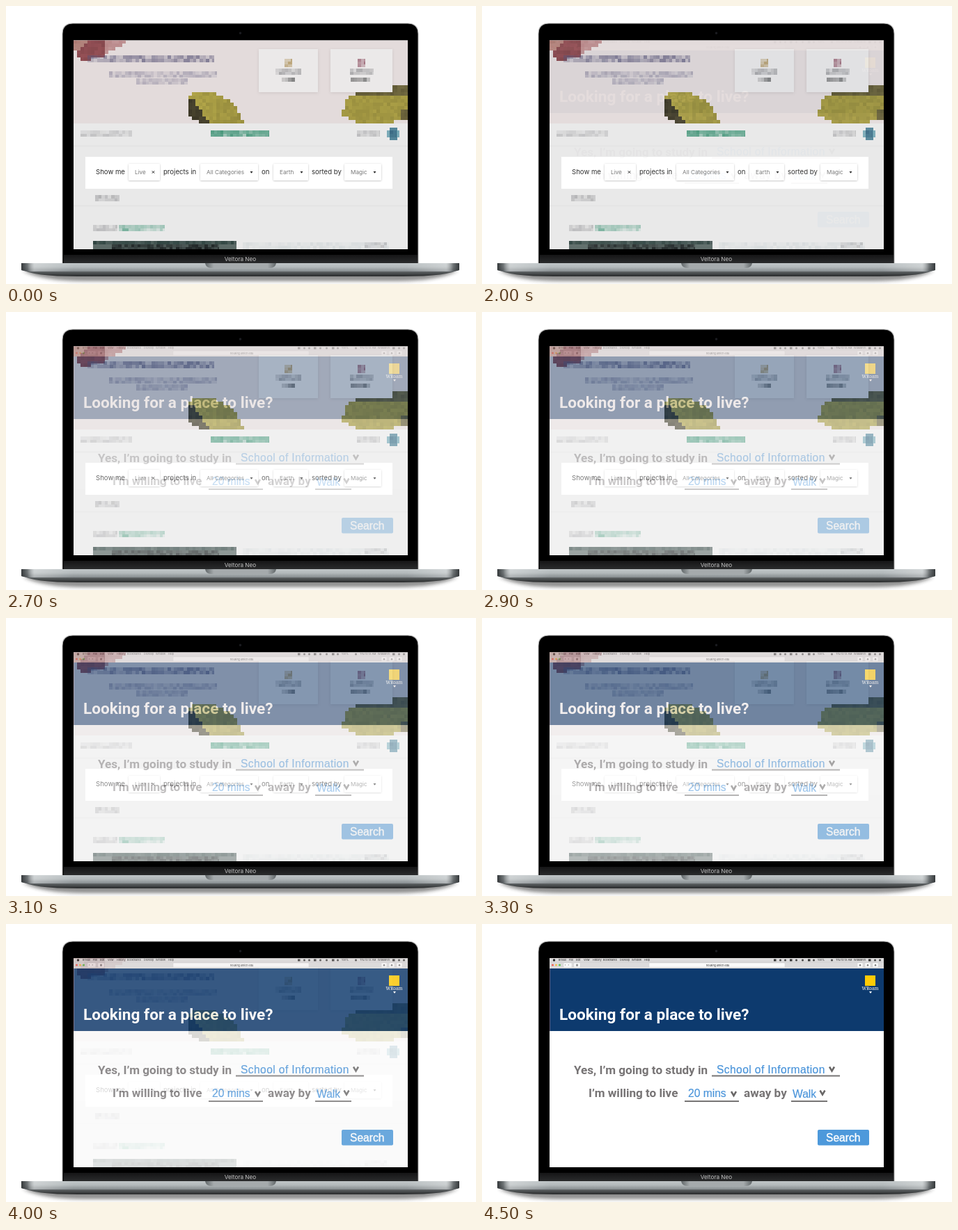
Recreate the animation shown at these times as an HTML page. Size 675 px wide and 400 px high, loop 6.5 s.

```html
<!DOCTYPE html>
<html lang="en">
<head>
<meta charset="utf-8">
<title>Laptop screen crossfade</title>
<style>
  html, body { margin: 0; width: 100%; height: 100%; overflow: hidden; background: #fff; }
  svg { display: block; width: 100vw; height: 100vh; }
  text { white-space: pre; }
  .inter { font-family: Inter, sans-serif; }
  .label { font-size: 9.6px; fill: #2b2b2b; }
  .choice { font-size: 8.2px; fill: #777; }
  .bold { font: bold 17.1px Roboto, sans-serif; fill: #777475; }
  .blue { font: 15.6px "Liberation Sans", Arial, sans-serif; fill: #4a94da; stroke: #4a94da; stroke-width: .2; }
  .tiny { font: 3.7px Inter, sans-serif; fill: #222; }
</style>
</head>
<body>
<svg viewBox="0 0 675 400">
  <defs>
    <linearGradient id="metal" x2="0" y2="1">
      <stop offset="0" stop-color="#bfc5c7"/><stop offset=".45" stop-color="#b4babc"/>
      <stop offset="1" stop-color="#858b8e"/>
    </linearGradient>
    <linearGradient id="ends">
      <stop offset="0" stop-color="#34383a"/><stop offset=".014" stop-color="#34383a" stop-opacity=".55"/>
      <stop offset=".03" stop-color="#fff" stop-opacity=".3"/><stop offset=".12" stop-color="#fff" stop-opacity="0"/>
      <stop offset=".88" stop-color="#fff" stop-opacity="0"/><stop offset=".97" stop-color="#fff" stop-opacity=".3"/>
      <stop offset=".986" stop-color="#34383a" stop-opacity=".55"/><stop offset="1" stop-color="#34383a"/>
    </linearGradient>
    <linearGradient id="under" x2="0" y2="1">
      <stop offset="0" stop-color="#7b8082"/><stop offset="1" stop-color="#27292a"/>
    </linearGradient>
    <linearGradient id="chin" x2="0" y2="1">
      <stop offset="0" stop-color="#151516"/><stop offset="1" stop-color="#2a2b2c"/>
    </linearGradient>
    <linearGradient id="notch">
      <stop offset="0" stop-color="#5f6567"/><stop offset=".12" stop-color="#a5aaac"/>
      <stop offset=".88" stop-color="#a5aaac"/><stop offset="1" stop-color="#5f6567"/>
    </linearGradient>
    <filter id="blur" x="-10%" y="-50%" width="120%" height="200%"><feGaussianBlur stdDeviation="2.5"/></filter>
    <filter id="lift" x="-20%" y="-30%" width="140%" height="170%">
      <feDropShadow dx="0" dy=".6" stdDeviation="1" flood-opacity=".28"/>
    </filter>
    <filter id="glow" x="-10%" y="-20%" width="120%" height="140%">
      <feDropShadow dx="0" dy="1" stdDeviation="2" flood-opacity=".1"/>
    </filter>
    <clipPath id="screen"><path d="M97 49.5H577V350H97Z"/></clipPath>
    <path id="deck" d="M22 370H651V380Q645 382 630 382H43Q28 382 22 380Z"/>
    <path id="lid" d="M82 370V40Q82 26 96 26H577Q591 26 591 40V370Z"/>
  </defs>

  <!-- laptop -->
  <path d="M24 381H649Q620 396 560 396H113Q53 396 24 381Z" fill="#222" opacity=".5" filter="url(#blur)"/>
  <use href="#lid" fill="none" stroke="#000" stroke-opacity=".3" stroke-width="3"/>
  <use href="#lid" stroke="#000"/>
  <path d="M83 358H591V370H83Z" fill="url(#chin)"/>
  <circle cx="336.5" cy="39" r="1.8" fill="#1b1c20"/>
  <text class="inter" x="336.5" y="367" text-anchor="middle" font-size="8.2" fill="#c4c4c4">Veltora Neo</text>
  <path d="M22 379H651Q636 389 570 389H103Q38 389 22 379Z" fill="url(#under)"/>
  <use href="#deck" fill="url(#metal)"/>
  <use href="#deck" fill="url(#ends)"/>
  <path d="M286 370H388Q387 377 379 377H295Q287 377 286 370Z" fill="url(#notch)"/>

  <g clip-path="url(#screen)">
    <!-- first page -->
    <path d="M97 49H577V350H97Z" fill="#e9e9e9"/>
    <path d="M97 49H577V169H97Z" fill="#e3dbdb"/>
    <g id="fruit" shape-rendering="crispEdges"></g>
    <path d="M363 62h85v62h-85ZM466 62h89v62h-89Z" fill="#ebe9e9" filter="url(#glow)"/>
    <path d="M97 201.5H577M97 287.5H577" stroke="#e3e3e3" stroke-width="2"/>
    <g id="blurred" shape-rendering="crispEdges"></g>
    <path d="M114 217H555V263H114Z" fill="#fff"/>
    <g id="filters" class="inter"></g>

    <!-- second page -->
    <g id="finder" opacity="0">
      <path d="M97 49H577V350H97Z" fill="#fff"/>
      <path d="M97 49H577V64H97Z" fill="#dcdbdc"/>
      <path d="M97 55H577" stroke="#c3c2c3" stroke-width=".5"/>
      <path d="M97 64H577V154H97Z" fill="#0d3a6e"/>
      <path d="M97.2 64V154" stroke="#b78087" stroke-width=".7"/>
      <g id="browser"></g>
      <path d="M550 74h15v15h-15Z" fill="#ffcb05"/>
      <text x="557.5" y="94.8" text-anchor="middle" font-family="Noto Serif, serif" font-size="6.3" fill="#fff">WRoam</text>
      <path d="M556 97h4l-2 3Z" fill="#fff"/>
      <text class="bold" x="111" y="138.3" style="font-size:22.6px;fill:#fff">Looking for a place to live?</text>
      <text class="bold" x="132" y="215.5">Yes, I’m going to study in</text>
      <text class="blue" x="337" y="215" letter-spacing=".4">School of Information</text>
      <text class="bold" x="153" y="249">I’m willing to live</text>
      <text class="blue" x="296" y="249">20 mins</text>
      <text class="bold" x="376" y="249">away by</text>
      <text class="blue" x="446" y="249.5">Walk</text>
      <path d="M330 218.5H514M291 255H369M444 255H496" stroke="#767474" stroke-width="2.2"/>
      <path d="M499 205.5l3.5 6 3.5-6M358 241l3.5 6 3.5-6M485.5 239.5l3.5 6 3.5-6" fill="none" stroke="#696767" stroke-width="2.5"/>
      <rect x="482" y="296" width="74" height="22.5" rx="2" fill="#4d99db"/>
      <text class="blue" x="494" y="313" style="fill:#fff;stroke:#fff;stroke-width:.35">Search</text>
    </g>
  </g>
</svg>
<script>
const byId = id => document.getElementById(id);

function add(parent, tag, attributes, content = '') {
  const node = document.createElementNS(parent.namespaceURI, tag);
  for (const key in attributes) node.setAttribute(key, attributes[key]);
  node.textContent = content;
  parent.append(node);
  return node;
}

let seed = 71;
const random = () => (seed = seed * 16807 % 2147483647) / 2147483647;
const rect = (parent, x, y, width, height, fill, opacity = 1) =>
  add(parent, 'rect', { x, y, width, height, fill, opacity });

// Pixelated outline; shade(x, y) picks the colour of each cell.
const canvas = document.createElement('canvas').getContext('2d');
function mosaic(outline, shade) {
  const cell = 5, path = new Path2D(outline);
  for (let y = 49; y < 169; y += cell) {
    for (let x = 97; x < 577; x += cell) {
      // Sampled in page coordinates, so the test canvas needs no size.
      if (canvas.isPointInPath(path, x + cell / 2, y + cell / 2)) {
        rect(byId('fruit'), x, y, cell, Math.min(cell, 169 - y), shade(x, y));
      }
    }
  }
}
const hsl = (h, s, l) => `hsl(${h} ${s}% ${l + random() * 5}%)`;

mosaic('M97 49H173L166 58 150 64 136 76 108 77 97 62Z', (x, y) =>
  x + y < 162 ? hsl(8, 26, 56) : x < 140 ? hsl(355, 30, 40) : hsl(358, 26, 62));
mosaic('M270 123H298L322 137 336 154 342 170H283L261 157V135Z', (x, y) =>
  x - 265 < (y - 128) * .62 && y > 130 ? hsl(48, 22, 19) : hsl(53, 42, 45 - (x - 260) * .06));
mosaic('M487 134L503 125H553V115H577V162L545 169H507L483 156Z', (x, y) =>
  y < 126 || x > 565 && y > 148 ? hsl(50, 28, 30) : hsl(53, 42, 42));

// Each row is a censored piece of the page: x, y, width, height, colour, strength.
function censor(x, y, width, height, color, strength) {
  const cell = 4.6, rows = Math.max(1, Math.round(height / cell));
  for (let row = 0; row < rows; row++) {
    for (let dx = 0; dx < width; dx += cell) {
      rect(byId('blurred'), x + dx, y + row * height / rows, Math.min(cell, width - dx),
        height / rows, color, strength * (.25 + .75 * random()));
    }
  }
}
const gray = '#77777b', green = '#45967a';
[
  [117, 71, 182, 10, '#5c5779', .7],
  [148, 94, 155, 9, '#77738f', .5],
  [187, 104, 74, 9, '#77738f', .45],
  [400, 76, 11, 12, '#a98b4f', .8],
  [387, 90, 37, 9, gray, .55],
  [396, 103, 19, 6, '#555', .7],
  [505, 76, 11, 12, '#93596a', .8],
  [494, 90, 34, 9, gray, .55],
  [495, 103, 28, 6, '#555', .7],
  [107, 179, 74, 9, gray, .35],
  [294, 179, 84, 9, green, .9],
  [294, 179, 84, 9, green, .7],
  [504, 179, 33, 9, gray, .4],
  [128, 272, 35, 9, gray, .5],
  [125, 315, 35, 9, gray, .4],
  [162, 315, 31, 9, green, .75],
  [193, 315, 35, 9, green, .45],
  [340, 340, 210, 10, '#b5c0c4', .35],
  [515, 340, 32, 8, gray, .3],
].forEach(piece => censor(...piece));
rect(byId('blurred'), 125, 338, 206, 12, '#5d6b68');
censor(125, 338, 206, 5, '#263c39', .9);
censor(152, 343, 154, 7, '#161b1c', .9);
rect(byId('blurred'), 551, 175, 11, 18, '#55869a');
rect(byId('blurred'), 547, 179, 18, 10, '#609bac', .8);
censor(551, 179, 10, 10, '#244a69', .8);

const filters = byId('filters');
const text = (parent, x, y, content, className) =>
  add(parent, 'text', { x, y, class: className }, content);
[[129, 'Show me'], [226, 'projects in'], [367, 'on'], [439, 'sorted by']]
  .forEach(([x, label]) => text(filters, x, 241.8, label, 'label'));
[[176, 45, 'Live'], [279, 83, 'All Categories'], [384, 50, 'Earth'], [486, 53, 'Magic']]
  .forEach(([x, width, label]) => {
    add(filters, 'rect', { x, y: 227, width, height: 24, rx: 1.5, fill: '#fff', filter: 'url(#lift)' });
    text(filters, x + 9, 242, label, 'choice');
    const end = x + width - 9.5;
    add(filters, 'path', label === 'Live'
      ? { d: `M${end - 1.7} 237.3l3.4 3.4m0-3.4l-3.4 3.4`, stroke: '#222', 'stroke-width': 1 }
      : { d: `M${end - 2} 238h4l-2 2.8Z`, fill: '#222' });
  });

const browser = byId('browser');
[[110, 'Brolux'], [125, 'File'], [135, 'Edit'], [146, 'View'], [159, 'History'],
 [174, 'Bookmarks'], [198, 'Develop'], [215, 'Window'], [233, 'Help'],
 [482, '100%'], [508, 'Thu 12:13 AM'], [534, 'WuMaren']]
  .forEach(([x, label]) => text(browser, x, 53.3, label, 'tiny'));
const dot = (cx, cy, r, fill) => add(browser, 'circle', { cx, cy, r, fill });
dot(103.5, 52, 1.7, '#222');
[419, 427, 434, 442, 450, 459, 468, 475, 501, 555, 563, 570]
  .forEach((x, i) => i % 3 ? dot(x + 1.5, 52, 1.5, '#444') : rect(browser, x, 50.5, 3.5, 3, '#333'));
['#ee6259', '#f5bd4f', '#62c555'].forEach((color, i) => dot(101.5 + i * 5, 59, 1.6, color));
const field = (x, width) => add(browser, 'rect',
  { x, y: 56, width, height: 6.4, rx: 1, fill: '#fafafa', stroke: '#c9c9c9', 'stroke-width': .4 });
[[117, 12], [132, 9], [240, 195], [539, 8], [550, 8], [561, 8]].forEach(part => field(...part));
text(browser, 119, 60.4, '‹   ›', 'tiny');
text(browser, 322, 60.6, 'housing.umich.edu', 'tiny');
rect(browser, 135, 57.7, 3, 3, '#999');
[543, 554, 565].forEach(x => dot(x, 59.2, 1.2, '#777'));

const LOOP = 6500, FADE_START = 2000, STEP = 100, STEPS = 26;
const start = performance.now();
function play(now) {
  const time = Math.max(0, now - start) % LOOP;
  const step = Math.floor((time - FADE_START) / STEP) + 1;
  byId('finder').setAttribute('opacity', Math.min(STEPS, Math.max(0, step)) / STEPS);
  requestAnimationFrame(play);
}
requestAnimationFrame(play);
</script>
</body>
</html>
```
